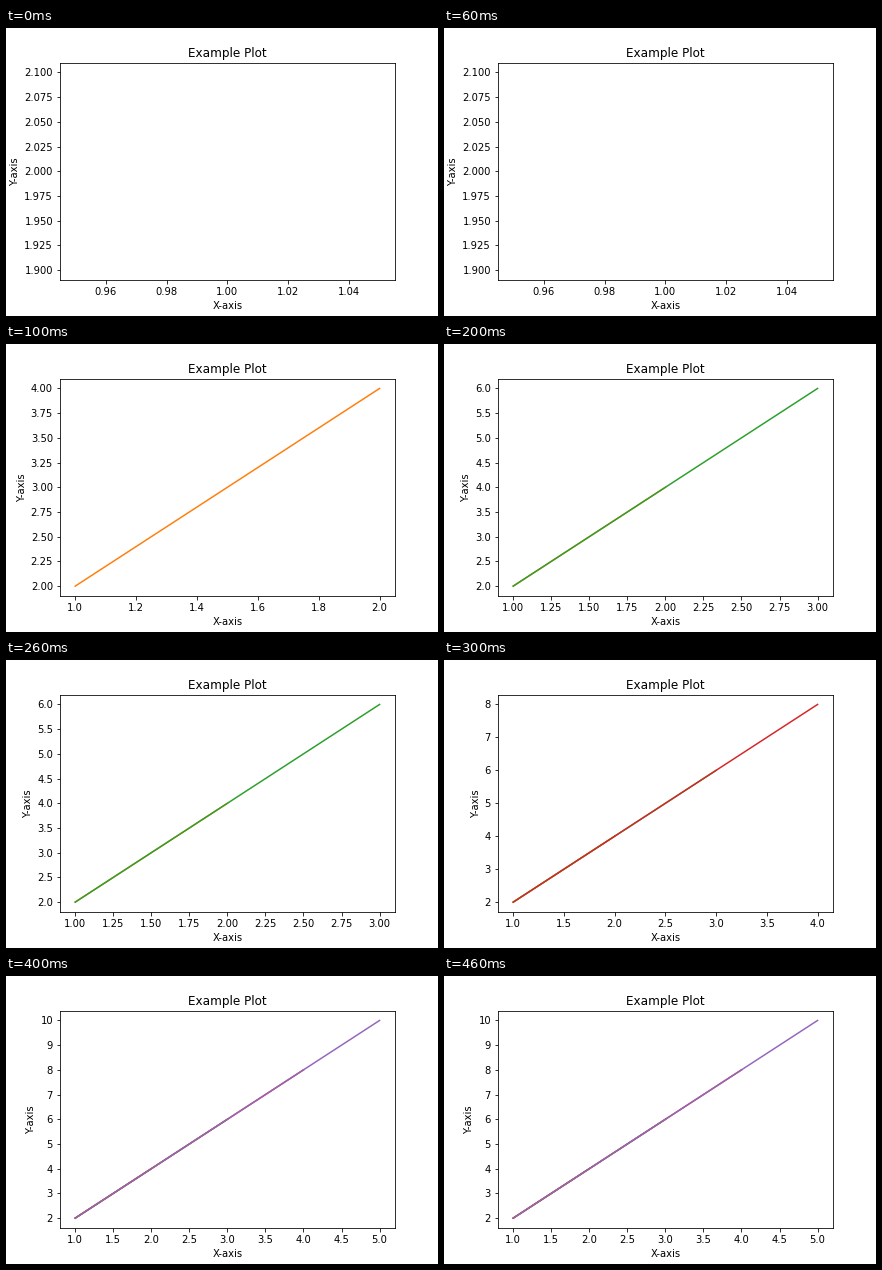
Recreate the animation shown at these times as a matplotlib script. Size 432 by 288 pixels, loop 0.5 s.

```python
import matplotlib.pyplot as plt
import numpy as np
from matplotlib.animation import FuncAnimation

STEPS = 5
x = np.arange(1, STEPS + 1)
y = 2 * x

fig, ax = plt.subplots(figsize=(6, 4), dpi=72, facecolor="white")
fig.subplots_adjust(left=0.125, right=0.9, bottom=0.125, top=0.88)


def draw(step):
    """Overlay one line per step so far, each a point longer than the last."""
    ax.clear()
    for n in range(1, step + 2):
        ax.plot(x[:n], y[:n])
    ax.set_xlabel("X-axis")
    ax.set_ylabel("Y-axis")
    ax.set_title("Example Plot")
    return ax.lines


anim = FuncAnimation(fig, draw, frames=STEPS, interval=100,
                     repeat=True, repeat_delay=0)
plt.show()
```
